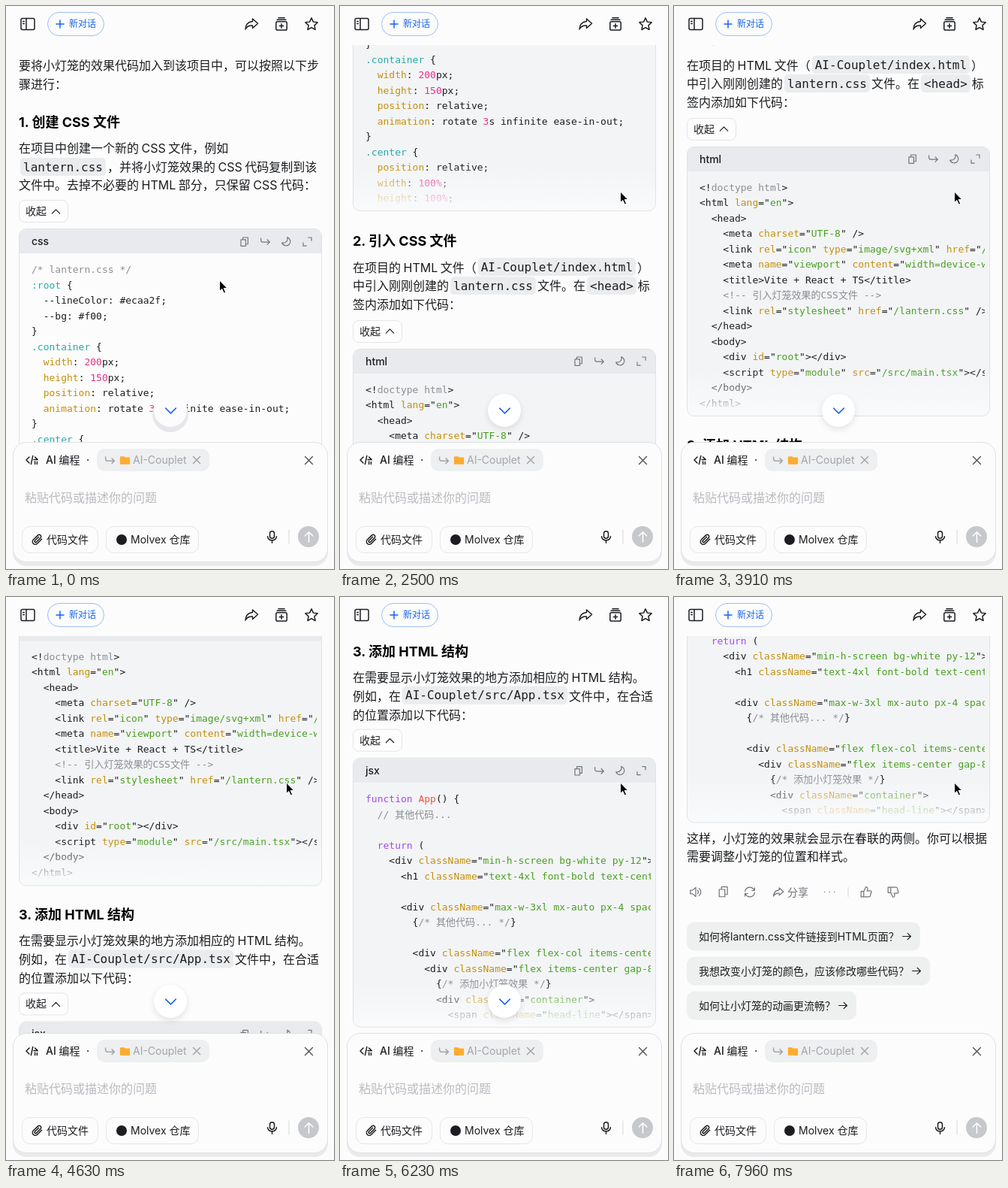
Recreate the animation shown at these times as an HTML page. Size 437 by 749 pixels, loop 8000 ms.

```html
<!DOCTYPE html>
<html lang="zh-CN">
<head>
<meta charset="utf-8">
<style>
html, body { margin: 0; width: 100%; height: 100%; overflow: hidden; background: #fcfcfc; }
body { position: relative; color: #1b1d20; font: 16px/24px Inter, "Noto Sans CJK SC", sans-serif; }
div, p, h2, i, #cursor { position: absolute; margin: 0; box-sizing: border-box; }
p, h2 { left: 17px; margin-top: -12px; white-space: pre; }
p { word-spacing: -1px; }
h2 { font-size: 18px; font-weight: 700; color: #000; }
.s { font-size: 14px; word-spacing: 0; }
.m { font-weight: 500; }
code, pre { font-family: "DejaVu Sans Mono", "Noto Sans CJK SC", monospace; word-spacing: 0; }
code { position: relative; top: -1px; font-size: 16px; margin: 0 2px; padding: 2.5px 4px; border-radius: 5px; background: #ebecee; }
i { width: 1em; height: 1em; margin: -.5em; font-size: 20px; }
i svg { display: block; width: 100%; height: 100%; overflow: visible; fill: none; stroke: currentColor;
  stroke-width: 1.5px; stroke-linecap: round; stroke-linejoin: round; }
path { vector-effect: non-scaling-stroke; }

#view { left: 0; top: 52px; width: 437px; height: 558px; overflow: hidden; }
#page { left: 0; top: -52px; width: 437px; height: 2020px; }
#page svg { stroke-width: 1.2px; }
.toggle { left: 17px; width: 66px; height: 30px; border: 1px solid #e3e5e8; border-radius: 8px; background: #fdfdfd; }
.block { left: 17px; width: 404px; height: 359px; overflow: hidden; border: 1px solid #e0e2e5; border-radius: 10px; background: #f3f4f6; }
.idle .block { background: #fcfcfc; }
.bar { left: 0; top: 0; width: 100%; height: 32px; background: #e9eaed; color: #74777d; }
.bar p { left: 16px; top: 16px; color: #1b1d20; }
.bar i { top: 16px; font-size: 13px; }
.block::after { content: ""; position: absolute; left: 0; right: 0; bottom: 0; height: 60px;
  background: linear-gradient(#f9fafb00, #f9fafb); }
pre { position: absolute; left: 16px; top: 44.25px; width: 380px; margin: 0; overflow: hidden; font-size: 13px; line-height: 20.5px; }
.note { color: #8b8e93; } .str { color: #48a020; } .attr { color: #c4900c; } .num { color: #e8308c; }
.sel { color: #2aa9a4; } .key { color: #a449e6; } .fn { color: #ee5340; }
.gray { color: #6f7278; }
.chip { height: 38px; margin-top: -19px; padding: 0 12px 0 16px; border-radius: 10px; background: #eef0ef; font-size: 14px; line-height: 38px; }
.chip i { position: static; display: inline-block; margin: 0 0 0 4px; font-size: 12px; vertical-align: -1px; }

#new { left: 55px; top: 8px; width: 76px; height: 32px; border: 1px solid #9dbdfb; border-radius: 16px; }
.blue { color: #1463f3; }
#down { left: 197px; top: 516px; width: 44px; height: 44px; border-radius: 50%; background: #fff; box-shadow: 0 3px 9px #0000001c; }
.idle #down { background: #fcfcfc; box-shadow: 0 5px 0 2px #e6e7ea; }
#panel { left: 9px; top: 580px; width: 420px; height: 160px; border: 1px solid #dfe1e4; border-radius: 18px;
  background: #fcfcfc; box-shadow: 0 5px 0 #e9eaec; }
.button { top: 692px; height: 36px; border: 1px solid #e6e7ea; border-radius: 11px; }
.pale { color: #a2a5aa; }
#cursor { left: 0; top: 0; overflow: visible; }
</style>
</head>
<body>
<div id="view"><div id="page">
  <p style="top:79px">要将小灯笼的效果代码加入到该项目中，可以按照以下步</p>
  <p style="top:103.5px">骤进行：</p>
  <h2 style="top:155px">1. 创建 CSS 文件</h2>
  <p style="top:189px">在项目中创建一个新的 CSS 文件，例如</p>
  <p style="top:214px"><code>lantern.css</code>，并将小灯笼效果的 CSS 代码复制到该</p>
  <p style="top:238px">文件中。去掉不必要的 HTML 部分，只保留 CSS 代码：</p>
  <div class="block" data-title="css" style="top:296px"><pre>
/* lantern.css */
:root {
  --lineColor: #ecaa2f;
  --bg: #f00;
}
.container {
  width: 200px;
  height: 150px;
  position: relative;
  animation: rotate 3s infinite ease-in-out;
}
.center {
  position: relative;
  width: 100%;
  height: 100%;</pre></div>

  <h2 style="top:695px">2. 引入 CSS 文件</h2>
  <p style="top:729.5px">在项目的 HTML 文件（<code>AI-Couplet/index.html</code>）</p>
  <p style="top:754px">中引入刚刚创建的<code>lantern.css</code>文件。在<code>&lt;head></code>标</p>
  <p style="top:779px">签内添加如下代码：</p>
  <div class="block" data-title="html" style="top:837.5px"><pre>
&lt;!doctype html>
&lt;html lang="en">
  &lt;head>
    &lt;meta charset="UTF-8" />
    &lt;link rel="icon" type="image/svg+xml" href="/vite.svg" />
    &lt;meta name="viewport" content="width=device-width, initial-scale=1.0" />
    &lt;title>Vite + React + TS&lt;/title>
    &lt;!-- 引入灯笼效果的CSS文件 -->
    &lt;link rel="stylesheet" href="/lantern.css" />
  &lt;/head>
  &lt;body>
    &lt;div id="root">&lt;/div>
    &lt;script type="module" src="/src/main.tsx">&lt;/script>
  &lt;/body>
&lt;/html></pre></div>

  <h2 style="top:1236px">3. 添加 HTML 结构</h2>
  <p style="top:1270px">在需要显示小灯笼效果的地方添加相应的 HTML 结构。</p>
  <p style="top:1294.5px">例如，在<code>AI-Couplet/src/App.tsx</code>文件中，在合适</p>
  <p style="top:1319.5px">的位置添加以下代码：</p>
  <div class="block" data-title="jsx" style="top:1377px"><pre>
function App() {
  // 其他代码...

  return (
    &lt;div className="min-h-screen bg-white py-12">
      &lt;h1 className="text-4xl font-bold text-center mb-8">

      &lt;div className="max-w-3xl mx-auto px-4 space-y-8">
        {/* 其他代码... */}

        &lt;div className="flex flex-col items-center">
          &lt;div className="flex items-center gap-8">
            {/* 添加小灯笼效果 */}
            &lt;div className="container">
              &lt;span className="head-line">&lt;/span></pre></div>

  <p style="top:1755.5px">这样，小灯笼的效果就会显示在春联的两侧。你可以根据</p>
  <p style="top:1780px">需要调整小灯笼的位置和样式。</p>
  <div class="gray" style="left:0;top:1827.5px">
    <i class="sound" style="left:29px;font-size:16px"></i>
    <i class="copy" style="left:65px;font-size:15px"></i>
    <i class="refresh" style="left:101px;font-size:16px"></i>
    <i class="share" style="left:139px;font-size:16px"></i>
    <p class="s" style="left:151px">分享</p>
    <i class="dots" style="left:207px"></i>
    <i class="rule" style="left:231.5px;font-size:12px;color:#d9dbde"></i>
    <i class="thumb" style="left:256px;font-size:16px"></i>
    <i class="thumb" style="left:292px;font-size:16px;transform:rotate(180deg) scaleX(-1)"></i>
  </div>
  <p class="chip" style="top:1886.5px">如何将lantern.css文件链接到HTML页面？<i class="arrow"></i></p>
  <p class="chip" style="top:1932.5px">我想改变小灯笼的颜色，应该修改哪些代码？<i class="arrow"></i></p>
  <p class="chip" style="top:1978.5px">如何让小灯笼的动画更流畅？<i class="arrow"></i></p>
</div></div>

<i class="side" style="left:29px;top:24px"></i>
<div id="new"></div>
<i class="plus blue" style="left:72px;top:24px;font-size:10px"></i>
<p class="m blue" style="left:84px;top:24px;font-size:12px">新对话</p>
<i class="share" style="left:327px;top:24px"></i>
<i class="collect" style="left:367px;top:24px;font-size:18px"></i>
<i class="star" style="left:407px;top:24px;font-size:18px"></i>

<div id="down"><i class="chevron blue" style="left:22px;top:22px;font-size:17px"></i></div>

<div id="panel"></div>
<i class="tag" style="left:35px;top:604px;font-size:16px"></i>
<p class="s m" style="left:53px;top:604px">AI 编程</p>
<p class="s m" style="left:107px;top:604px">·</p>
<div style="left:121px;top:589px;width:150px;height:30px;border-radius:10px;background:#eeeff1"></div>
<i class="wrap pale" style="left:138px;top:604px;font-size:13px"></i>
<i class="folder" style="left:158px;top:604px;font-size:13px;color:#ffab2e"></i>
<p class="s pale" style="left:169px;top:604px">AI-Couplet</p>
<i class="cross pale" style="left:254px;top:604px;font-size:10px"></i>
<i class="cross" style="left:403px;top:604px;font-size:11px;color:#55585d"></i>
<p style="left:25px;top:654px;color:#b9bbc0">粘贴代码或描述你的问题</p>
<div class="button" style="left:21px;width:102px"></div>
<i class="clip" style="left:42px;top:710px;font-size:16px"></i>
<p class="s" style="left:54px;top:710px">代码文件</p>
<div class="button" style="left:133px;width:124px"></div>
<div style="left:147px;top:703px;width:14px;height:14px;border-radius:50%;background:#1b1d20"></div>
<p class="s" style="left:166px;top:710px">Molvex 仓库</p>
<i class="mic" style="left:354px;top:706px;font-size:17px"></i>
<i class="rule" style="left:376.5px;top:706px;font-size:18px;color:#e3e5e8"></i>
<div style="left:389px;top:692px;width:28px;height:28px;border-radius:50%;background:#c6c8cb"></div>
<i class="arrow" style="left:403px;top:706px;font-size:15px;color:#fff;transform:rotate(-90deg)"></i>

<svg id="cursor" width="12" height="18"><path d="M0 0V14.5L3.3 11.4 5.8 17 8.1 16 5.7 10.5H10.3Z" stroke="#fff"/></svg>

<script>
const icons = {
  side: "M3 2.5H17Q19 2.5 19 4.5V15.5Q19 17.5 17 17.5H3Q1 17.5 1 15.5V4.5Q1 2.5 3 2.5ZM8 2.5V17.5M3.7 6.5H5.3M3.7 9.5H5.3",
  plus: "M10 0V20M0 10H20",
  share: "M11.5 3 18.5 9.3 11.5 15.5V12C6.5 11.6 3.8 13.3 2 17 2.2 11 5.5 7.2 11.5 6.6Z",
  collect: "M4 6.5H16Q18 6.5 18 8.5V17Q18 19 16 19H4Q2 19 2 17V8.5Q2 6.5 4 6.5ZM3.5 3.5H16.5M5.5 .7H14.5M10 9.8V15.8M7 12.8H13",
  star: "M10 1 12.7 6.8 19 7.6 14.4 12 15.6 18.3 10 15.2 4.4 18.3 5.6 12 1 7.6 7.3 6.8Z",
  copy: "M3 6H13V19H3ZM7 6V1.5H17.5V15H13",
  wrap: "M1 3V7Q1 11 5 11H19M14 6 19 11 14 16",
  moon: "M12 1C14 8 9 13.5 1 12.5 4 19 12 20 16.5 15 20 10.5 18 3.5 12 1Z",
  expand: "M12 1.5H18.5V8M8 18.5H1.5V12",
  sound: "M1 7H4.5L10 2.5V17.5L4.5 13H1ZM13 7Q15.5 10 13 13M15.8 3.8Q21 10 15.8 16.2",
  refresh: "M2 9A8 8 0 0 1 16.5 5.5L18 7.5M18 3V7.5H13.5M18 11A8 8 0 0 1 3.5 14.5L2 12.5M2 17V12.5H6.5",
  dots: "M3.5 10H4M10 10H10.5M16.5 10H17",
  rule: "M10 0V20",
  thumb: "M6 9 9.5 1.5C12 1.5 13 3 12.4 5L11.6 8H17Q19 8 18.6 10L17 16.2Q16.5 18 14.8 18H6ZM1.5 9H6V18H1.5Z",
  arrow: "M1 10H19M12 3 19 10 12 17",
  chevron: "M2 6 10 14 18 6",
  tag: "M5 5 0 10 5 15M11 3 8 17M14.5 5 19 9.5H12.5M14.5 12.5V17M18 13V17",
  folder: "M1 3H8L10 5H19V17H1Z",
  cross: "M1 1 19 19M19 1 1 19",
  clip: "M17 9 9.5 16.5A4.5 4.5 0 0 1 3 10L10.5 2.7A3 3 0 0 1 15 7L8 14A1.6 1.6 0 0 1 5.6 11.6L12 5.3",
  mic: "M10 1Q13.5 1 13.5 4.5V8.5Q13.5 12 10 12 6.5 12 6.5 8.5V4.5Q6.5 1 10 1ZM3 9Q3.5 15 10 15 16.5 15 17 9M10 15V19"
};
const $ = selector => [...document.querySelectorAll(selector)];
const [page, down, cursor] = ["page", "down", "cursor"].map(id => document.getElementById(id));

const syntax = new RegExp([
  String.raw`(?<note>/\*.*?\*/|//.*|&lt;!--.*?--&gt;|doctype html)`,
  `(?<str>(?<==")[^"]+)`,
  String.raw`(?<attr>\w+(?==")|^ +[a-z]+(?=:))`,
  String.raw`(?<num>\d+(?=px|s )|\d+%)`,
  String.raw`(?<sel>^[.:]\w+)`,
  String.raw`(?<key>\bfunction\b|\breturn\b)`,
  String.raw`(?<fn>App(?=\())`
].join("|"), "gm");

$("pre").forEach(pre => {
  pre.innerHTML = pre.innerHTML.replace(syntax, (text, ...rest) => {
    const kind = Object.entries(rest.at(-1)).find(([, value]) => value)[0];
    return `<span class="${kind}">${text}</span>`;
  });
});

$(".block").forEach(block => {
  const tools = ["copy", "wrap", "moon", "expand"]
    .map((name, k) => `<i class="${name}" style="left:${299 + 28 * k}px"></i>`).join("");
  block.insertAdjacentHTML("afterbegin", `<div class="bar"><p class="s m">${block.dataset.title}</p>${tools}</div>`);
  block.insertAdjacentHTML("beforebegin", `<div class="toggle" style="top:${parseFloat(block.style.top) - 38}px">
    <p class="s" style="left:8px;top:14px">收起</p>
    <i class="chevron" style="left:48px;top:14px;font-size:13px;transform:scaleY(-1)"></i></div>`);
});

$("i").forEach(el => {
  const name = el.classList[0], fill = name === "folder" ? "currentColor" : "none";
  el.innerHTML = `<svg viewBox="0 0 20 20"><path fill="${fill}" d="${icons[name]}"/></svg>`;
});

const LOOP = 8000, STEP = 89;
const scrollKeys = [[11, 0], [17, 162], [28, 382], [44, 651], [61, 997], [77, 1280.5], [89, 1435.5]];
const cursorPath = [[284.5, 365], [288, 368], [291, 370], [291, 370], [305, 346], [335, 300], [362, 260], [373.5, 247]];
const bottom = scrollKeys.at(-1)[1];

// Smooth curve through the keys, at rest at both ends.
function scrollAt(step) {
  const last = scrollKeys.length - 1;
  const slope = k => {
    if (k === 0 || k === last) return 0;
    const [a, b] = [scrollKeys[k - 1], scrollKeys[k + 1]];
    return (b[1] - a[1]) / (b[0] - a[0]);
  };
  if (step <= scrollKeys[0][0]) return 0;
  if (step >= scrollKeys[last][0]) return bottom;
  const k = scrollKeys.findIndex(key => key[0] > step) - 1;
  const [x0, y0] = scrollKeys[k], [x1, y1] = scrollKeys[k + 1];
  const w = x1 - x0, u = (step - x0) / w, v = 1 - u;
  return y0 * v * v * (1 + 2 * u) + y1 * u * u * (3 - 2 * u) + w * u * v * (slope(k) * v - slope(k + 1) * u);
}

function draw() {
  const step = Math.floor((performance.now() % LOOP + 8) / STEP);
  const [x, y] = cursorPath[Math.min(step, cursorPath.length - 1)];
  const scroll = scrollAt(step);
  page.style.transform = `translateY(${-scroll}px)`;
  cursor.style.transform = `translate(${x}px, ${y}px)`;
  document.body.classList.toggle("idle", scroll === 0);
  down.hidden = bottom - scroll < 100;
  requestAnimationFrame(draw);
}
draw();
</script>
</body>
</html>
```
